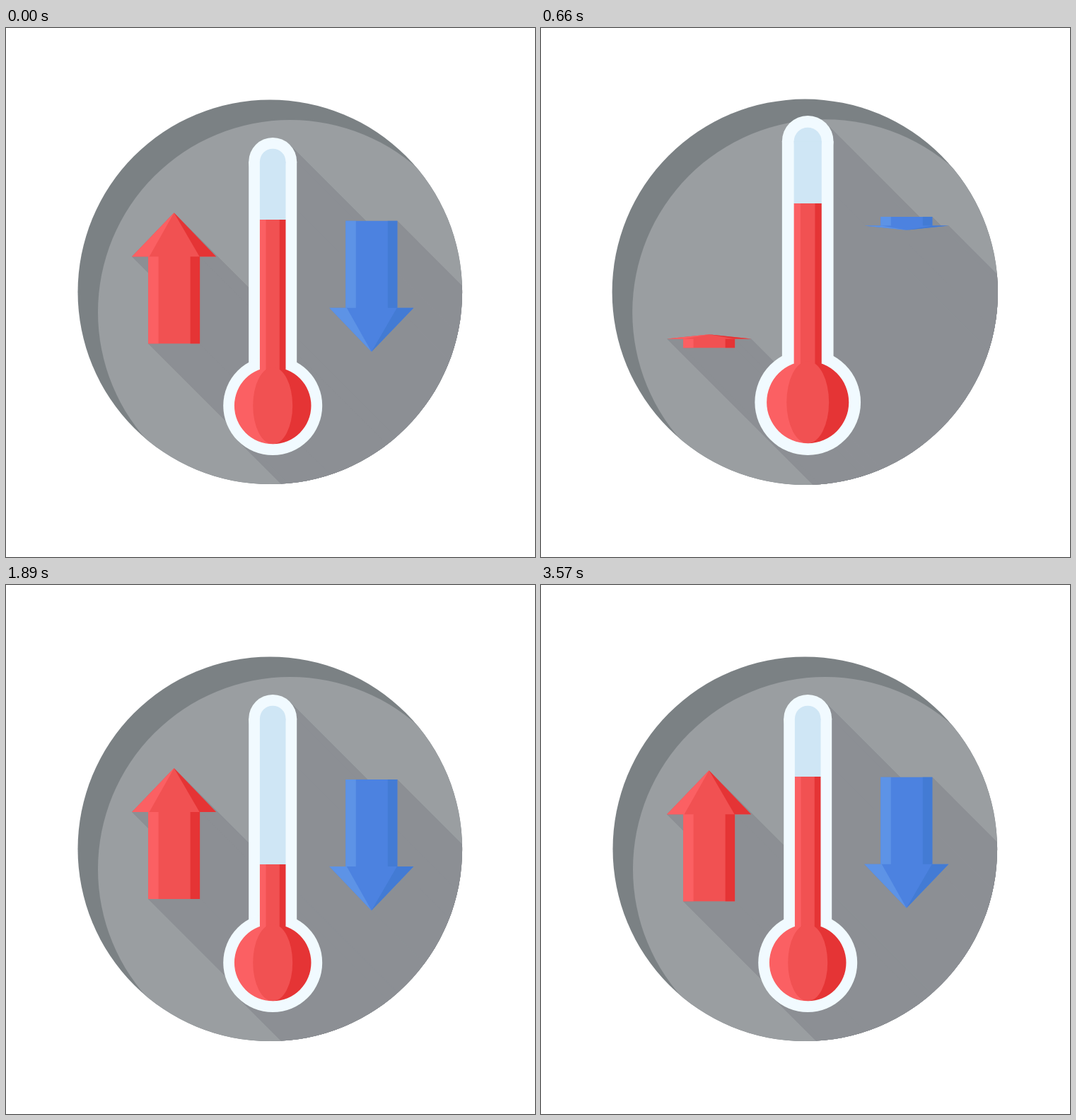
An HTML page with a canvas that plays this animation: 748 px wide and 748 px high, repeating every 3600 ms.

```html
<!DOCTYPE html>
<html lang="en">
<head>
<meta charset="utf-8">
<title>Thermometer</title>
<style>
  html, body { margin: 0; width: 100%; height: 100%; overflow: hidden; background: #fff; }
  canvas { display: block; }
</style>
</head>
<body>
<canvas id="stage" width="748" height="748"></canvas>
<script>
const ctx = document.getElementById('stage').getContext('2d');
const LOOP = 3600, STEP = 30;
const GREY = { rim: '#7b8184', face: '#9a9ea1', shade: '#8c8f94' };
const RED = ['#fb6063', '#f15152', '#e53435'];
const BLUE = ['#5d93e6', '#4c82e0', '#437bd4'];
const GLASS = '#f1faff', EMPTY = '#cfe6f5';
const DISC = { x: 373.3, y: 373.3, r: 271.8, shift: 28.5 };
const THERMO = { x: 377.2, foot: 604, cap: 189, bulb: 534, level: 271, low: 395 };
const TAU = Math.PI * 2;

// Damped oscillation from 0 to 1
function spring(t, start, speed) {
  const a = Math.max(0, t - start) * speed;
  return 1 - Math.exp(-0.75 * a) * Math.cos(a);
}

function ease(t, from, to) {
  const p = Math.min(1, Math.max(0, (t - from) / (to - from)));
  return (1 - Math.cos(p * Math.PI)) / 2;
}

function poly(color, pts) {
  ctx.fillStyle = color;
  ctx.beginPath();
  pts.forEach(([x, y]) => ctx.lineTo(x, y));
  ctx.fill();
}

function rect(color, x, y, w, h) {
  ctx.fillStyle = color;
  ctx.fillRect(x, y, w, h);
}

function circle(x, y, r) {
  ctx.beginPath();
  ctx.arc(x, y, r, 0, TAU);
}

function disc(color, x, y, r) {
  ctx.fillStyle = color;
  circle(x, y, r);
  ctx.fill();
}

// Long shadows run down and to the right at 45 degrees
function castPoly(pts) {
  const far = 700;
  pts.forEach(([x, y], i) => {
    const [u, v] = pts[(i + 1) % pts.length];
    poly(GREY.shade, [[x, y], [u, v], [u + far, v + far], [x + far, y + far]]);
  });
}

function castCircle(x, y, r) {
  const d = r * Math.SQRT1_2;
  castPoly([[x - d, y + d], [x + d, y - d]]);
}

function arrow(x, base, dir, size, colors) {
  const at = (dx, h) => [x + dx, base + dir * h * size];
  return {
    outline: [at(-36.5, 0), at(-36.5, 123), at(-59.5, 123), at(0, 185),
              at(59.5, 123), at(36.5, 123), at(36.5, 0)],
    draw() {
      poly(colors[1], this.outline);
      poly(colors[0], [at(-36.5, 0), at(-22, 0), at(-22, 123), at(-36.5, 123)]);
      poly(colors[2], [at(36.5, 0), at(23, 0), at(23, 123), at(36.5, 123)]);
      poly(colors[0], [at(-59.5, 123), at(-35, 123), at(0, 185)]);
      poly(colors[2], [at(59.5, 123), at(36, 123), at(0, 185)]);
    }
  };
}

function castThermo(size) {
  const { x, foot, cap, bulb } = THERMO;
  const y = v => foot + (v - foot) * size, w = 34 * size;
  castCircle(x, y(cap), w);
  castCircle(x, y(bulb), 70 * size);
  castPoly([[x - w, y(cap)], [x + w, y(cap)], [x + w, y(bulb)], [x - w, y(bulb)]]);
}

function drawThermo(size, level) {
  const { x, foot, cap, bulb } = THERMO;
  ctx.save();
  ctx.translate(x, foot);
  ctx.scale(size, size);
  ctx.translate(0, -foot);

  disc(GLASS, 0, cap, 34);
  rect(GLASS, -34, cap, 68, bulb - cap);
  disc(GLASS, 0, bulb, 70);
  disc(EMPTY, 0, cap, 18.3);
  rect(EMPTY, -18.3, cap, 36.6, level - cap + 1);

  // Liquid, clipped to tube and bulb
  ctx.beginPath();
  ctx.rect(-18.3, level, 36.6, bulb - level);
  ctx.moveTo(54.3, bulb);
  ctx.arc(0, bulb, 54.3, 0, TAU);
  ctx.clip();
  rect(RED[0], -60, level, 60, 360);
  rect(RED[2], 0, level, 60, 360);
  rect(RED[1], -9.6, level, 19.2, 484 - level);
  ctx.fillStyle = RED[1];
  ctx.beginPath();
  ctx.ellipse(0, bulb, 28, 54.3, 0, 0, TAU);
  ctx.fill();
  ctx.restore();
}

function draw(t) {
  rect('#fff', 0, 0, 748, 748);
  const face = spring(t, 148, 0.009);
  const glass = spring(t, 465, 0.0095);
  const grow = spring(t, 640, 0.0066);
  const drift = 4.5 + 4.5 * Math.cos(TAU * (t - 177) / 900);
  const drop = ease(t, 1350, 1800) - ease(t, 2650, 3150);
  const level = THERMO.level + (THERMO.low - THERMO.level) * drop;
  const arrows = grow > 0 ? [
    arrow(237.6, 452.3 - drift, -1, grow, RED),
    arrow(516.8, 266.8 + drift, 1, grow, BLUE)
  ] : [];
  if (face <= 0) return;

  const r = DISC.r * face, s = DISC.shift * face;
  disc(GREY.rim, DISC.x, DISC.y, r);
  ctx.save();
  circle(DISC.x, DISC.y, r);
  ctx.clip();
  circle(DISC.x + s, DISC.y + s, r);
  ctx.clip();
  rect(GREY.face, 0, 0, 748, 748);
  if (glass > 0) castThermo(glass);
  arrows.forEach(a => castPoly(a.outline));
  ctx.restore();

  arrows.forEach(a => a.draw());
  if (glass > 0) drawThermo(glass, level);
}

const begin = performance.now();
function frame() {
  const now = Math.max(0, performance.now() - begin) % LOOP;
  const t = Math.floor(now / STEP) * STEP;
  draw(t < STEP ? t + LOOP : t); // the loop opens on the finished pose
  requestAnimationFrame(frame);
}
frame();
</script>
</body>
</html>
```
